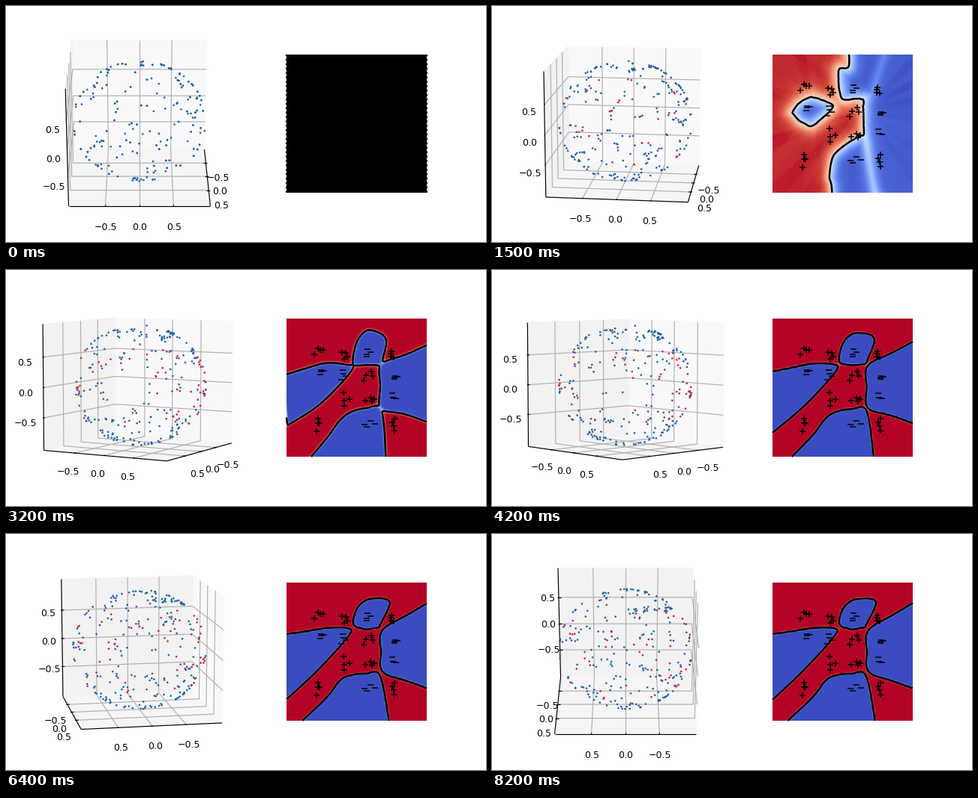
A matplotlib script for the animation above (8.3 s loop, 640x316 px).

```python
import numpy as np
import matplotlib.pyplot as plt
from matplotlib.animation import FuncAnimation
from matplotlib.collections import LineCollection, PolyCollection
from matplotlib.path import Path
from matplotlib.patches import Rectangle

W, H, DPI = 640, 316, 100
FRAMES, STEP = 83, 100
PX = 72 / DPI  # points per pixel

plt.rcParams["font.family"] = "DejaVu Sans"
fig = plt.figure(figsize=(W / DPI, H / DPI), dpi=DPI, facecolor="white")
ax = fig.add_axes([0, 0, 1, 1])
ax.axis("off")
rng = np.random.default_rng(12)


def settle(i, start, pace):
    """Ease from 0 towards 1, beginning at a given step."""
    return 1 - np.exp(-max(0, i - start) / pace)


# ---------------------------------------------------------------- 3D view
LIMIT = 1.04
LABEL_GAP = 0.093
BLUE, RED = np.array([0.12, 0.39, 0.67]), np.array([0.87, 0.10, 0.21])
PANE_COLORS = ["0.975", "0.95", "0.9625"]


def project(p, i):
    """Map box coordinates (-0.5..0.5) to stage pixels for step i."""
    turn = np.pi * i / (FRAMES - 1)
    azim = np.pi / 4 * (1 - np.cos(turn))
    elev = np.radians(25 - 20 * np.sin(turn) ** 1.05)
    x, y, z = p[..., 0], p[..., 1], p[..., 2]
    right = y * np.cos(azim) - x * np.sin(azim)
    near = x * np.cos(azim) + y * np.sin(azim)
    up = z * np.cos(elev) - near * np.sin(elev)
    depth = near * np.cos(elev) + z * np.sin(elev)
    k = 10 / (10 - depth)
    return np.stack([178 + 184.4 * right * k, 154 - 167 * up * k], axis=-1)


def box_lines():
    """Grid lines, axis lines with tick marks, and labels with anchors."""
    h, out, inn = 0.5, 0.5 + 1 / 120, 0.5 - 1 / 60
    far = h + LABEL_GAP
    grid, labels = [], []
    lines = [[(-h, h, -h), (h, h, -h)],
             [(h, -h, -h), (h, h, -h)],
             [(h, -h, -h), (h, -h, h)]]
    for v in (-0.5, 0.0, 0.5):
        t = v / (2 * LIMIT)
        grid += [[(t, h, -h), (t, -h, -h), (t, -h, h)],
                 [(h, t, -h), (-h, t, -h), (-h, t, h)],
                 [(h, -h, t), (-h, -h, t), (-h, h, t)]]
        lines += [[(t, out, -h), (t, inn, -h)],
                  [(out, t, -h), (inn, t, -h)],
                  [(out, -h, t), (inn, -h, t)]]
        text = f"{v:.1f}".replace("-", "\u2212")
        labels += [(text, (t, far, -far)), (text, (far, t, -far)),
                   (text, (far, -far, t))]
    return np.array(grid), np.array(lines), labels


grid, lines, labels = box_lines()
square = np.array([(-0.5, -0.5), (0.5, -0.5), (0.5, 0.5), (-0.5, 0.5)])
panes = np.array([np.insert(square, k, -0.5, axis=1) for k in range(3)])

# the last points start on top of earlier ones and then part from them
BASE, COPIES = 170, 105
N = BASE + COPIES
source = np.r_[np.arange(BASE), np.arange(COPIES)]
z0 = rng.uniform(-0.99, 0.99, BASE)[source]
phi0 = rng.uniform(-np.pi, np.pi, BASE)[source]
is_copy = np.arange(N) >= BASE
shift_z, shift_phi = rng.normal(0, (0.06, 0.16), (N, 2)).T * is_copy
turns_red = (np.abs(z0) < 0.6) & (rng.random(N) < 0.5)
flip_at = np.where(turns_red, rng.uniform(10, 20, N), np.inf)


def sphere(i):
    s = settle(i, 8, 14)
    phi = phi0 + s * shift_phi
    z = np.clip(z0 + s * shift_z, -0.99, 0.99)
    z = np.sign(z) * np.abs(z) ** (1 - 0.15 * s * ~turns_red)
    r = np.sqrt(1 - z ** 2)
    return np.stack([r * np.cos(phi), r * np.sin(phi), z], -1) / (2 * LIMIT)


pane_art = PolyCollection([], facecolors=PANE_COLORS, edgecolors=PANE_COLORS,
                          linewidths=0.8)
grid_art = LineCollection([], colors="#b0b0b0", linewidths=0.85)
line_art = LineCollection([], colors="black", linewidths=0.85)
for art in (pane_art, grid_art, line_art):
    ax.add_collection(art)
dots = ax.scatter(np.zeros(N), np.zeros(N), s=3.6, linewidths=0, zorder=3)
texts = [ax.text(0, 0, s, fontsize=9, ha="center", va="baseline", zorder=4)
         for s, _ in labels]
anchors = np.array([p for _, p in labels])

# ------------------------------------------------------- decision map
X0, X1, Y0, Y1 = 374, 561, 65, 250
EARLY, MIDDLE = 9, 22
# each blue region: outline when first seen, half way, and settled
LEFT = (
    [(407, 138), (416, 126), (427, 121), (438, 126), (445, 139), (425, 153),
     (412, 148)],
    [(391, 148), (402, 134), (424, 123), (446, 127), (467, 131), (430, 169),
     (408, 162)],
    [(350, 137), (395, 131), (428, 126), (455, 126), (457, 136), (412, 186),
     (350, 244)])
TOP = (
    [(485, 123), (468, 117), (459, 74), (477, 84), (476, 20), (560, 20),
     (520, 120)],
    [(484, 126), (463, 131), (466, 98), (474, 78), (484, 72), (500, 95),
     (504, 130)],
    [(480, 128), (464, 122), (465, 107), (473, 94), (488, 87), (512, 91),
     (497, 125)])
RIGHT = (
    [(640, -30), (520, -30), (495, 122), (494, 150), (497, 172), (500, 330),
     (640, 330)],
    [(640, 85), (545, 115), (500, 122), (498, 150), (498, 187), (540, 191),
     (640, 235)],
    [(640, 45), (540, 105), (502, 129), (500, 158), (503, 185), (540, 199),
     (640, 235)])
BOTTOM = (
    [(490, 330), (473, 251), (457, 242), (455, 206), (482, 178), (497, 178),
     (540, 330)],
    [(418, 265), (430, 232), (442, 212), (457, 193), (478, 183), (503, 186),
     (500, 265)],
    [(370, 272), (425, 221), (445, 196), (460, 189), (480, 187), (499, 191),
     (513, 262)])
REGIONS = np.array([LEFT, TOP, RIGHT, BOTTOM], float)
jitter = rng.normal(0, 1.2, REGIONS[:, 0].shape)

xs, ys = np.linspace(X0, X1, 80), np.linspace(Y0, Y1, 79)
gx, gy = np.meshgrid(xs, ys)
cells = np.stack([gx.ravel(), gy.ravel()], -1)
flat = (cells[:, 0] + 1j * cells[:, 1]).astype(np.complex64)


def outlines(i):
    first, half, last = REGIONS[:, 0], REGIONS[:, 1], REGIONS[:, 2]
    if i < MIDDLE:
        u = np.clip((i - EARLY) / (MIDDLE - EARLY), 0, 1)
        return first + (half - first) * u + jitter * max(0, EARLY - i)
    return half + (last - half) * settle(i, MIDDLE, 12)


def curve(p, roundness):
    """Open cardinal spline; zero roundness gives straight pieces."""
    m = np.gradient(p, axis=0) * roundness
    t = np.linspace(0, 1, 7, endpoint=False)[None, :, None]
    a, b, ma, mb = p[:-1, None], p[1:, None], m[:-1, None], m[1:, None]
    line = a + (b - a) * (3 * t ** 2 - 2 * t ** 3)
    line = line + (t ** 3 - 2 * t ** 2 + t) * ma + (t ** 3 - t ** 2) * mb
    return np.vstack([line.reshape(-1, 2), p[-1:]])


def signed_distance(poly):
    """Positive inside the polygon."""
    c = (poly[:, 0] + 1j * poly[:, 1]).astype(np.complex64)
    d = np.roll(c, -1) - c
    rel = flat[:, None] - c
    t = np.clip((rel * d.conj()).real / np.abs(d) ** 2, 0, 1)
    dist = np.abs(rel - t * d).min(axis=1)
    inside = Path(poly).contains_points(cells)
    return np.where(inside, dist, -dist)


def rays(cx, cy, count):
    """Fan-shaped streaks around a point."""
    values = rng.uniform(-1, 1, count)
    angle = np.arctan2(gy - cy, gx - cx) / (2 * np.pi) + 0.5
    return values[(angle * count).astype(int) % count]


streaks = 0.14 * rays(492, 140, 46) + 0.1 * rays(430, 140, 31)
lean = 0.25 * (gy - 158) / 93 * (gx < 480)
fields = {}


def field(i):
    """Signed distance to the border of all blue regions together."""
    if i not in fields:
        roundness = np.clip((i - EARLY) / 8, 0, 1)
        parts = [signed_distance(curve(p, roundness)) for p in outlines(i)]
        joined = 2 * np.logaddexp.reduce(np.array(parts) / 2)
        rough = np.clip((18 - i) / 9, 0, 1)
        fields[i] = joined.reshape(gx.shape) + 9 * rough * streaks
    return fields[i]


hx, hy = (xs[1] - xs[0]) / 2, (ys[1] - ys[0]) / 2
image = ax.imshow(np.zeros(gx.shape + (4,)), interpolation="bilinear",
                  aspect="auto", zorder=1,
                  extent=(X0 - hx, X1 + hx, Y1 + hy, Y0 - hy))
image.set_clip_path(Rectangle((X0, Y0), X1 - X0, Y1 - Y0,
                              transform=ax.transData))
ax.set_xlim(0, W)
ax.set_ylim(H, 0)

# labelled samples: small clusters on a loose 4 x 4 lattice
LABELS = ("++-+", "--+-", " ++-", "+ -+")
for row, signs in enumerate(LABELS):
    for col, sign in enumerate(signs):
        if sign == " ":
            continue
        px, py = rng.normal((418 + 32.5 * col, 110 + 32 * row), 4, (4, 2)).T
        ax.plot(px, py, {"+": "+", "-": "_"}[sign], color="black",
                ms=8 * PX, mew=1.5 * PX, zorder=6)

blank = [ax.add_patch(Rectangle((X0, Y0), X1 - X0, Y1 - Y0, fc="black",
                                lw=0, zorder=7))]
for x in (X0, X1):
    blank += ax.plot([x, x], [Y0, Y1], ":", color="black", lw=1.6, zorder=7)

cmap = plt.get_cmap("coolwarm")
border = []


def draw_map(i):
    while border:
        border.pop().remove()
    for art in blank:
        art.set_visible(i == 0)
    image.set_visible(i > 0)
    if i == 0:
        return
    f = field(i)
    soft = np.exp(np.interp(i, [1, EARLY, MIDDLE, 42],
                            np.log([150, 44, 2, 0.8])))
    early = np.clip((20 - i) / 8, 0, 1)
    value = np.tanh(f / soft * (1 + early * (streaks + lean)))
    value = value * (1 - 0.1 * early) - early * 0.3 * streaks
    image.set_data(cmap(0.5 - 0.5 * np.clip(value, -1, 1)))
    border.append(ax.contour(xs, ys, f, levels=[0], colors="black",
                             linewidths=2.5 * PX, zorder=5))


def draw(i):
    pane_art.set_verts(project(panes, i))
    grid_art.set_segments(project(grid, i))
    line_art.set_segments(project(lines, i))
    dots.set_offsets(project(sphere(i), i))
    dots.set_facecolors(np.where((i >= flip_at)[:, None], RED, BLUE))
    for text, (x, y) in zip(texts, project(anchors, i)):
        text.set_position((x + 0.5, y + 10.5))
    draw_map(i)
    return []


anim = FuncAnimation(fig, draw, frames=FRAMES, interval=STEP, repeat=True,
                     repeat_delay=0, init_func=lambda: [], blit=False)
plt.show()
```
